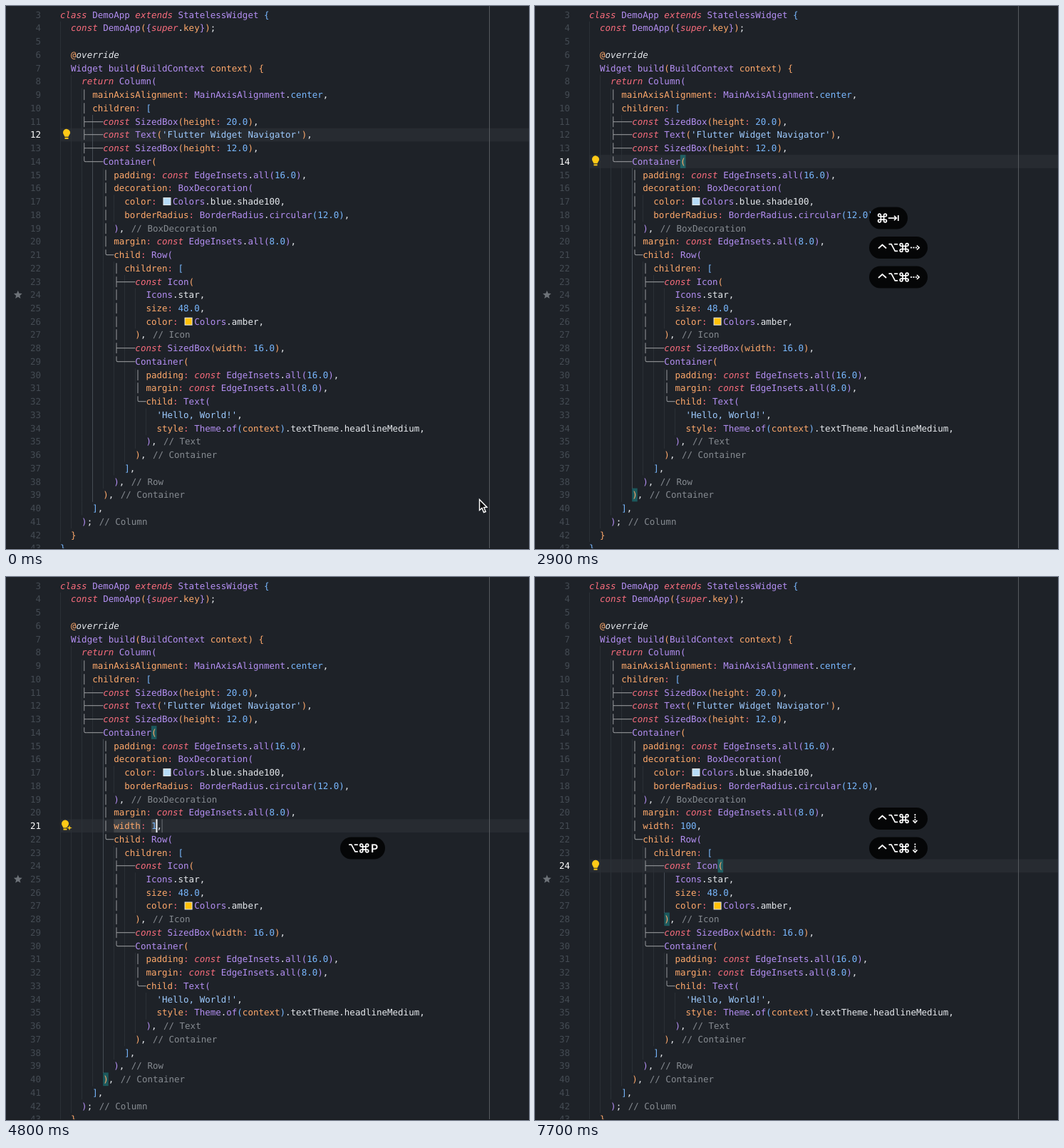
An HTML page with a canvas for the animation above (8000 ms loop, 734 by 763 pixels).

```html
<!DOCTYPE html>
<html lang="en">
<head>
<meta charset="utf-8">
<title>Widget navigation in a code editor</title>
<style>
html, body { margin: 0; width: 100%; height: 100%; overflow: hidden; background: #1e2228; }
canvas { display: block; }
</style>
</head>
<body>
<canvas id="stage" width="734" height="763"></canvas>
<script>
const ctx = document.getElementById('stage').getContext('2d');
const W = 734, H = 763, LOOP = 8000;
const LEFT = 76, CHAR = 7.525, ROW = 18.74, FIRST = 3, BASE = 16.7;
const MONO = '12.5px "DejaVu Sans Mono", monospace';
const C = {
  bg: '#1e2228', text: '#e6e9ed', red: '#fa6d7d', purple: '#b48ff3', orange: '#ffa96b',
  blue: '#79b8ff', string: '#9ecbff', note: '#868b91', tree: '#9a9c9f', link: '#4e9bd6',
  number: '#444b53', guide: '#2b3036', guideOn: '#454c54', rowOn: '#272b31', bulb: '#ffc917'
};
const BRACKETS = [C.blue, C.orange, C.purple];

const CODE = `class DemoApp extends StatelessWidget {
  const DemoApp({super.key});

  @override
  Widget build(BuildContext context) {
    return Column(
    │ mainAxisAlignment: MainAxisAlignment.center,
    │ children: [
    ├───const SizedBox(height: 20.0),
    ├───const Text('Flutter Widget Navigator'),
    ├───const SizedBox(height: 12.0),
    ╰───Container(
        │ padding: const EdgeInsets.all(16.0),
        │ decoration: BoxDecoration(
        │   color: ■■Colors.blue.shade100,
        │   borderRadius: BorderRadius.circular(12.0),
        │ ), // BoxDecoration
        │ margin: const EdgeInsets.all(8.0),
        ╰─child: Row(
          │ children: [
          ├───const Icon(
          │     Icons.star,
          │     size: 48.0,
          │     color: ■■Colors.amber,
          │   ), // Icon
          ├───const SizedBox(width: 16.0),
          ╰───Container(
              │ padding: const EdgeInsets.all(16.0),
              │ margin: const EdgeInsets.all(8.0),
              ╰─child: Text(
                  'Hello, World!',
                  style: Theme.of(context).textTheme.headlineMedium,
                ), // Text
              ), // Container
            ],
          ), // Row
        ), // Container
      ],
    ); // Column
  }
}`.split('\n');

// Editor states: caret place, matching brackets, selection, bulb row, typed value
const inContainer = [[14, 17], [40, 8]];
const STATES = [
  { t: 0, row: 12, bulb: 12 },
  { t: 900, row: 12, col: 19, pair: [[12, 18], [12, 45]], bulb: 12 },
  { t: 1900, row: 13, col: 23, pair: [[13, 22], [13, 35]], bulb: 13 },
  { t: 2300, row: 14, col: 18, pair: [[14, 17], [39, 8]], bulb: 14 },
  { t: 3300, row: 21, col: 15, sel: [10, 15], bulb: 14, value: 'double.infinity', snippet: true },
  { t: 4100, row: 21, col: 32, sel: [17, 32], bulb: 21, spark: true, value: 'double.infinity', snippet: true },
  ...['1', '10', '100'].map((value, i) => ({
    t: 4800 + i * 100, row: 21, col: 18 + i, pair: inContainer, bulb: 21, spark: true, value, snippet: true
  })),
  { t: 6400, blink: 6300, row: 22, col: 21, pair: [[22, 20], [39, 10]], bulb: 22, value: '100' },
  { t: 7100, row: 24, col: 25, pair: [[24, 24], [28, 14]], bulb: 24, value: '100' }
];

const next = ['ctrl', 'opt', 'cmd', 'right'], down = ['ctrl', 'opt', 'cmd', 'down'];
const PRESSES = [
  { t: 900, keys: ['cmd', 'tab'], w: 54 },
  { t: 1900, keys: next, w: 82 },
  { t: 2300, keys: next, w: 82 },
  { t: 3200, keys: ['opt', 'cmd', 'P'], w: 63 },
  { t: 6400, keys: down, w: 82 },
  { t: 7100, keys: down, w: 82 }
];
const HOLD = 2200, FADE = 300;

const colX = col => LEFT + col * CHAR;
const baseY = row => BASE + (row - FIRST) * ROW;
const topY = row => baseY(row) - 13.7;

function fillCols(row, from, to, color) {
  ctx.fillStyle = color;
  ctx.fillRect(colX(from), topY(row), (to - from) * CHAR, ROW);
}

function stroke(...points) {
  ctx.beginPath();
  points.forEach(([x, y]) => ctx.lineTo(x, y));
  ctx.stroke();
}

function write(str, x, y, color, italic) {
  ctx.font = (italic ? 'italic ' : '') + MONO;
  ctx.fillStyle = color;
  [...str].forEach((ch, i) => ctx.fillText(ch, x + i * CHAR, y));
}

function wordStyle(word, rest) {
  if (/^(class|extends|const|super|return)$/.test(word)) return [C.red, true];
  if (word === 'override') return [C.text, true];
  if (/^[A-Z]|^(build|of|all|circular)$/.test(word)) return [C.purple];
  if (/^(center|double)$/.test(word)) return [C.blue];
  if (rest[0] === ':' || /^(key|context)$/.test(word)) return [C.orange];
  return [C.text];
}

function drawSwatch(x, y, color) {
  ctx.fillStyle = '#e8eaec';
  ctx.fillRect(x + 1.5, y - 10, 11, 11);
  ctx.fillStyle = color;
  ctx.fillRect(x + 2.5, y - 9, 9, 9);
}

function drawCode(lines, linkRow) {
  const token = /\/\/.*|'[^']*'|[A-Za-z_]\w*|\d[\d.]*|[│├╰─]+|■+|\S/g;
  let depth = 0;
  lines.forEach((line, i) => {
    const row = FIRST + i, y = baseY(row);
    for (const match of line.matchAll(token)) {
      const word = match[0], rest = line.slice(match.index + word.length);
      let x = colX(match.index), style = [C.text];
      if (word[0] === '■') {
        drawSwatch(x, y, rest.includes('amber') ? '#ffc107' : '#b7dcf8');
        continue;
      }
      if (word.startsWith('//')) { style = [C.note]; x += 2; }
      else if (word[0] === "'") style = [C.string];
      else if (/[│├╰─]/.test(word)) style = [C.tree];
      else if (/^\d/.test(word)) style = [C.blue];
      else if ('([{'.includes(word)) style = [BRACKETS[depth++ % 3]];
      else if (')]}'.includes(word)) style = [BRACKETS[--depth % 3]];
      else if (word === ':') style = [C.red];
      else if (word === '@') style = [C.orange];
      else if (/^\w/.test(word)) style = wordStyle(word, rest);
      if (row === linkRow && word === 'children') {
        style = [C.link];
        ctx.fillStyle = C.link;
        ctx.fillRect(x, y + 1.5, word.length * CHAR, 1);
      }
      write(word, x, y, ...style);
    }
  });
}

function drawGuides(lines, caretRow) {
  const indents = lines.map(line => line ? line.search(/[^ │├╰─]/) : 2);
  let at = caretRow - FIRST;
  if (indents[at + 1] > indents[at]) at++;
  const active = indents[at] - 2;
  let from = at, to = at;
  while (indents[from - 1] > active) from--;
  while (indents[to + 1] > active) to++;
  indents.forEach((indent, i) => {
    for (let col = 0; col < indent; col += 2) {
      ctx.fillStyle = col === active && i >= from && i <= to ? C.guideOn : C.guide;
      ctx.fillRect(Math.round(colX(col)), topY(FIRST + i), 1, ROW + 0.5);
    }
  });
}

function drawStar(x, y, outer, inner, points, color) {
  ctx.fillStyle = color;
  ctx.beginPath();
  for (let i = 0; i < points * 2; i++) {
    const r = i % 2 ? inner : outer, a = i * Math.PI / points - Math.PI / 2;
    ctx.lineTo(x + r * Math.cos(a), y + r * Math.sin(a));
  }
  ctx.fill();
}

function drawBulb(row, spark) {
  const x = spark ? 83 : 85, y = baseY(row) - 5.5;
  ctx.fillStyle = C.bulb;
  ctx.beginPath();
  ctx.arc(x, y - 2, 5, Math.PI * 0.8, Math.PI * 2.2);
  ctx.lineTo(x + 2.5, y + 4);
  ctx.lineTo(x - 2.5, y + 4);
  ctx.fill();
  ctx.fillRect(x - 2.5, y + 5, 5, 2);
  if (spark) {
    drawStar(89, y + 4, 5, 2.5, 4, C.rowOn);
    drawStar(89, y + 4, 3.8, 1.3, 4, C.bulb);
  }
}

const KEYS = {
  ctrl() { stroke([-5.5, 1], [0, -4], [5.5, 1]); },
  opt() {
    stroke([-6.3, -4.8], [-2.7, -4.8], [2.5, 4.8], [6.3, 4.8]);
    stroke([1.3, -4.8], [6.3, -4.8]);
  },
  cmd() {
    for (const s of [-1, 1]) {
      stroke([s * 2.1, -4], [s * 2.1, 4]);
      stroke([-4, s * 2.1], [4, s * 2.1]);
      for (const v of [-1, 1]) {
        const a = Math.atan2(v, s);
        ctx.beginPath();
        ctx.arc(s * 4, v * 4, 1.9, a - Math.PI * 0.75, a + Math.PI * 0.75);
        ctx.stroke();
      }
    }
  },
  tab() {
    stroke([-7, 0], [4.5, 0]);
    stroke([1.2, -3.2], [4.5, 0], [1.2, 3.2]);
    stroke([7, -4], [7, 4]);
  },
  right() {
    for (const x of [-6.5, -3, 0.5]) stroke([x, 0], [x + 2.2, 0]);
    stroke([2.5, -3], [5.7, 0], [2.5, 3]);
  },
  down() {
    ctx.rotate(Math.PI / 2);
    KEYS.right();
  },
  P() {
    ctx.font = '600 16px Inter, sans-serif';
    ctx.fillText('P', -6, 5.8);
  }
};

function drawPill({ keys, w }, y, alpha) {
  ctx.save();
  ctx.globalAlpha = alpha;
  ctx.fillStyle = '#050607';
  ctx.beginPath();
  ctx.roundRect(469, y - 15.5, w, 31, 15.5);
  ctx.fill();
  ctx.fillStyle = ctx.strokeStyle = '#fff';
  ctx.lineWidth = 1.7;
  keys.forEach((key, i) => {
    ctx.save();
    ctx.translate(487.5 + i * 15.3, y);
    KEYS[key]();
    ctx.restore();
  });
  ctx.restore();
}

function drawPills(t) {
  const shown = PRESSES.filter(p => t >= p.t).reverse();
  shown.forEach((press, i) => {
    const left = 1 - Math.max(0, t - press.t - HOLD) / FADE;
    if (left > 0) drawPill(press, 381 - i * 41.5, left);
  });
}

function drawPointer(alpha) {
  ctx.save();
  ctx.globalAlpha = alpha;
  ctx.translate(664.5, 693.5);
  ctx.beginPath();
  [[0, 0], [0, 15], [3.5, 12], [6, 18], [8.7, 17], [6.2, 11.2], [10.5, 10.8]]
    .forEach(p => ctx.lineTo(...p));
  ctx.closePath();
  ctx.fillStyle = '#0b0c0e';
  ctx.strokeStyle = '#fff';
  ctx.lineWidth = 1.4;
  ctx.fill();
  ctx.stroke();
  ctx.restore();
}

function drawSnippet(row, value) {
  const end = 17 + value.length, gray = 'rgba(124,124,124,.3)';
  fillCols(row, 10, 15, gray);
  fillCols(row, 17, end, gray);
  ctx.fillStyle = '#62676d';
  ctx.fillRect(colX(end + 1) - 0.5, topY(row), 1.2, ROW);
}

function draw(t) {
  const state = STATES.findLast(s => t >= s.t);
  const { row, col, pair = [], sel, value } = state;
  const lines = [...CODE];
  if (value) lines.splice(18, 0, `        │ width: ${value},`);
  lines.length = 41;

  ctx.fillStyle = C.bg;
  ctx.fillRect(0, 0, W, H);
  if (!sel) {
    ctx.fillStyle = C.rowOn;
    ctx.fillRect(LEFT, topY(row), W - LEFT, ROW);
  }
  drawGuides(lines, row);
  ctx.fillStyle = '#565a5f';
  ctx.fillRect(678, 0, 1, H);

  if (state.snippet) drawSnippet(row, value);
  if (sel) fillCols(row, ...sel, 'rgba(51,146,255,.3)');
  pair.forEach(([r, c]) => fillCols(r, c, c + 1, 'rgba(23,229,230,.28)'));

  lines.forEach((_, i) => {
    const n = FIRST + i, label = String(n);
    write(label, 49 - label.length * CHAR, baseY(n), n === row ? '#fff' : C.number);
  });
  drawCode(lines, t >= 1300 && t < 1900 ? 10 : 0);
  drawStar(16.8, baseY(value ? 25 : 24) - 4.2, 6.2, 2.8, 5, '#6d7278');
  drawBulb(state.bulb, state.spark);

  const blink = state.blink ?? state.t;
  if (col && Math.floor((t - blink) / 500) % 2 === 0) {
    ctx.fillStyle = '#f2f5f8';
    ctx.fillRect(Math.round(colX(col)) - 0.5, topY(row), 2, ROW);
  }
  drawPills(t);
  if (t < 200) drawPointer(t < 100 ? 1 : 0.5);
  ctx.fillStyle = '#15181c';
  ctx.fillRect(0, H - 1, W, 1);
}

function tick() {
  draw(Math.floor(performance.now() % LOOP / 100) * 100);
  requestAnimationFrame(tick);
}
ctx.textRendering = 'geometricPrecision';
tick();
</script>
</body>
</html>
```
